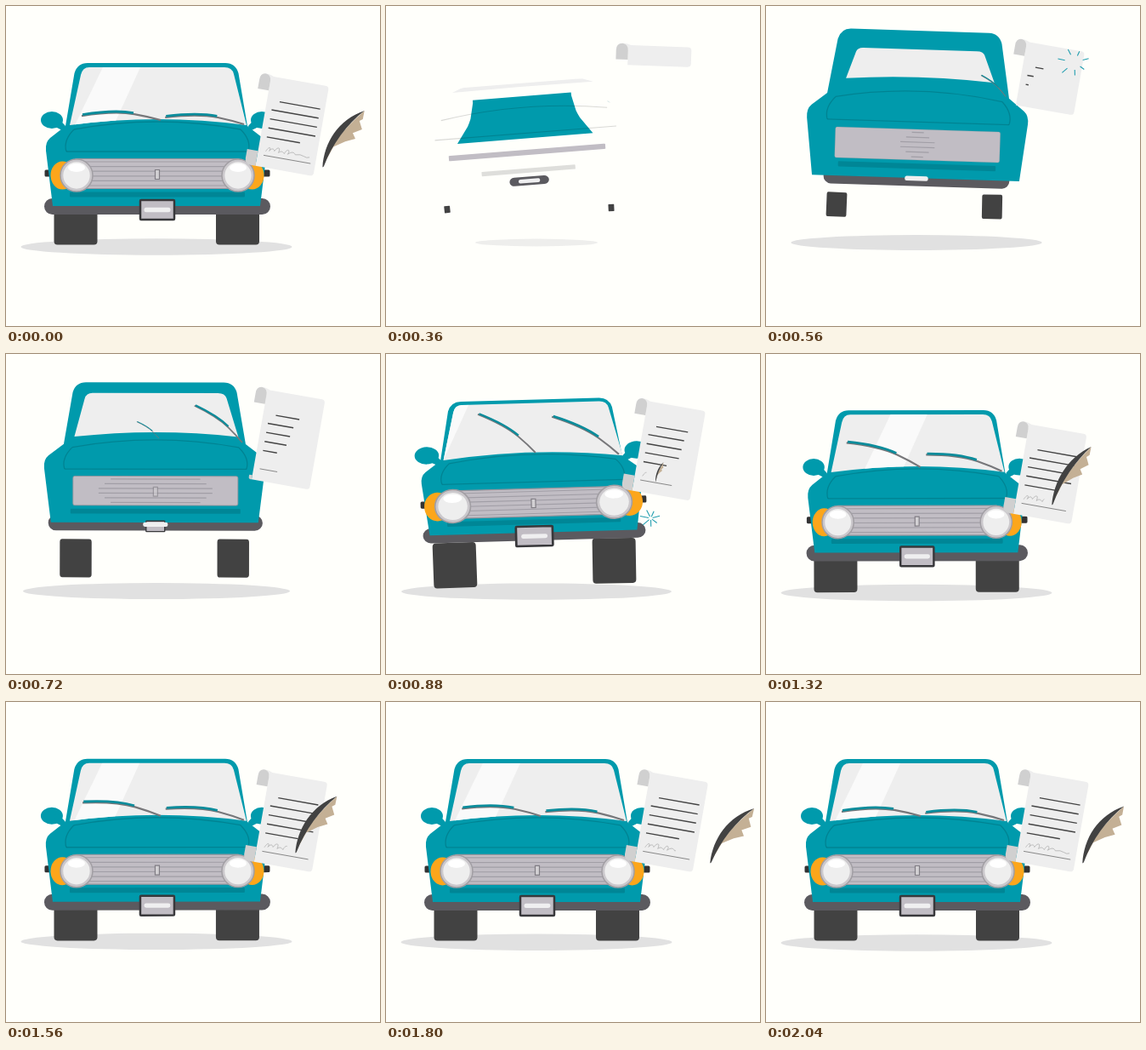
An HTML page for the animation above (2.08 s loop, 440x376 px).

```html
<!DOCTYPE html>
<html lang="en">
<head>
<meta charset="utf-8">
<title>Car contract</title>
<style>
  html, body { margin: 0; width: 100%; height: 100%; overflow: hidden; background: #fffffb; }
  svg { display: block; width: 440px; height: 376px; }
</style>
</head>
<body>
<svg viewBox="0 0 440 376">
  <defs><clipPath id="clip"><path id="pane" d="M98 72H257Q266 72 268 80L283 140Q178 126 75 140L88 81Q90 72 98 72Z"/></clipPath></defs>
  <g id="scene">
    <ellipse id="shadow" cx="177" fill="#e1e1e1"/>
    <rect id="wheelL" x="-25.5" y="-26" width="51" height="52" rx="4" fill="#424242"/>
    <rect id="wheelR" x="-25.5" y="-26" width="51" height="52" rx="4" fill="#424242"/>
    <g id="car">
      <rect id="bumper" fill="#5b5a5f"/>
      <g id="mirrorL" fill="#009aac"><ellipse rx="13" ry="10"/><path d="M5-5L16 7 14 13 2 7Z"/></g>
      <g id="mirrorR" fill="#009aac"><ellipse rx="13" ry="10"/><path d="M-5-5L-16 7-14 13-2 7Z"/></g>
      <rect id="markL" x="-4" y="-4" width="8" height="8" rx="1.5" fill="#333"/>
      <rect id="markR" x="-4" y="-4" width="8" height="8" rx="1.5" fill="#333"/>
      <path id="body" fill="#009aac"/>
      <g id="glass">
        <use href="#pane" fill="#eee"/>
        <g clip-path="url(#clip)"><path id="glare" d="M115 70H159L126 142H80Z" fill="#fafafa"/></g>
      </g>
      <g fill="none" stroke="#000" stroke-opacity=".15" stroke-width="1.3">
        <path d="M80 145Q178 127 276 145"/>
        <path d="M71 171H285"/>
        <path id="hoodSides" d="M80 145Q67 158 71 171M276 145Q289 158 285 171"/>
      </g>
      <rect id="strip" x="-103" y="218.5" width="206" height="6" rx="1" fill="#000" fill-opacity=".13"/>
      <g id="wiperL"></g>
      <g id="wiperR"></g>
      <rect id="grille" x="-97" y="-17.5" width="194" height="35" rx="2" fill="#c1bdc4" stroke="#99969e"/>
      <path id="slats" fill="none" stroke="#a19ea6" stroke-width="1.2"/>
      <rect id="badge" x="175.5" y="192.5" width="5" height="11" fill="#d2d0d3" stroke="#807d84" stroke-width="1.2"/>
      <g id="lampL"></g>
      <g id="lampR"></g>
      <rect id="plate" x="-20" y="-11.5" width="40" height="23" rx="1" fill="#c1bdc4" stroke="#38383b" stroke-width="2.5"/>
      <rect id="pill" x="-15.5" y="-2.7" width="31" height="5.4" rx="2.5" fill="#efeff0"/>
    </g>
    <g id="paper">
      <path id="sheet" fill="#eee"/>
      <path d="M0 17H-13V6Q-13-2-6-2Q0-1 0 6Z" fill="#d0d0d0"/>
      <path id="foot" d="M0 0V-18H-13V-7Q-13 0-5 0Z" fill="#d0d0d0"/>
      <path id="text" fill="none" stroke="#444" stroke-width="1.4"/>
      <path id="rule" fill="none" stroke="#777" stroke-width=".8"/>
      <path id="sign" pathLength="1" stroke-dasharray="1" fill="none" stroke="#b4b4b4" stroke-width=".8"
        d="M9 88c3-7 6-6 4-1 2-4 5-4 6-1 3-6 7-6 5 1 3-3 5-2 7 0 2-7 7-6 4 0 4-4 7-4 9-1q6-2 10 0t7 0"/>
    </g>
    <g id="feather">
      <path d="M2-4Q9-31 50-66L48-56 44-54 47-44 36-40 39-33 27-30 13-24Z" fill="#c4b095"/>
      <path d="M0 0C2-29 19-56 50-66C29-50 12-28 1.500-1Z" fill="#424242"/>
    </g>
    <path id="sparks" fill="none" stroke="#239fb0" stroke-width="1.1"/>
  </g>
</svg>
<script>
const LOOP = 2080, STEP = 40, BIRTH = 200, RISE = 360, APEX = 560, LAND = 880;
const $ = Object.fromEntries([...document.querySelectorAll('[id]')].map(el => [el.id, el]));
let t = 0;

const set = (el, attrs) => { for (const k in attrs) el.setAttribute(k, attrs[k]); };
const pose = (el, x, y, rot = 0, sx = 1, sy = sx, after = '') =>
  set(el, { transform: `translate(${x} ${y}) rotate(${rot}) scale(${sx} ${sy}) ${after}` });

// Easing: all of these read the current time.
const ramp = (a, b) => Math.min(1, Math.max(0, (t - a) / (b - a)));
const smooth = (a, b) => { const p = ramp(a, b); return p * p * (3 - 2 * p); };
const decay = (start, tau) => Math.exp(-Math.max(0, t - start) / tau);
const ease = (start, tau) => 1 - decay(start, tau);
const pulse = (a, b) => Math.sin(Math.PI * ramp(a, b));
const pop = (start, length, bounce = 1.7) => {
  const q = ramp(start, start + length) - 1;
  return 1 + (bounce + 1) * q ** 3 + bounce * q ** 2;
};
// A jump: rising pose, top, landing, then an exponential settle.
const jump = (rise, apex, land, rest) => t < LAND
  ? rise + (apex - rise) * smooth(RISE, APEX) + (land - apex) * smooth(APEX, LAND)
  : rest + (land - rest) * decay(LAND, 160);

const lamp = side => `<ellipse cx="${side * 16.5}" rx="14" ry="16.5" fill="#fca61b"/>
  <circle r="19" fill="#cbc8cc" stroke="#a19ea3" stroke-width="1.5"/>
  <circle r="15.7" fill="#eee"/><ellipse cy="-9" rx="10" ry="5" fill="#fff"/>`;
const wiper = `<g fill="none"><path d="M-93-5Q-55-11-31-7Q-14-4 0 0" stroke="#77777a" stroke-width="2.2"/>
  <path d="M-92-6.500Q-55-12.500-32-8.500" stroke="#0a8c9b" stroke-width="2.8"/></g>`;
$.lampL.innerHTML = lamp(-1);
$.lampR.innerHTML = lamp(1);
$.wiperL.innerHTML = $.wiperR.innerHTML = wiper;

// Half outline as [distance from the middle, y]; the other half is mirrored.
const HALF = [[81, 67], [93, 67], [96.5, 79], [107, 141], [125, 155], [131, 160], [130, 170], [122, 235]];

function bodyPath(morph) {
  const half = HALF.map(([x, y]) => {
    const f = (y - 67) / 168, seedX = 58 + 22 * f * f, seedY = 121 + 57 * f;
    return [seedX + (x - seedX) * morph, seedY + (y - seedY) * morph];
  });
  const right = half.map(([x, y]) => `${177 + x} ${y}`);
  const left = half.map(([x, y]) => `${177 - x} ${y}`).reverse();
  const [a, b, c, d, e, f, g, h] = right, [H, G, F, E, D, C, B, A] = left;
  return `M${a}Q${b} ${c}L${d} ${e}Q${f} ${g}L${h} ${H} ${G}Q${F} ${E}L${D} ${C}Q${B} ${A}Z`;
}

function slatPath(spread) {
  let d = '';
  for (let i = 0; i < 6; i++) {
    const half = 97 * spread * (1 - (1 - spread) * Math.abs(i - 2.5) / 2.7);
    if (half > 0) d += `M${178 - half} ${183 + i * 5.6}h${half * 2}`;
  }
  return d;
}

function drawCar() {
  const tilt = jump(-4.5, 1.8, -1.6, 0), born = ramp(BIRTH, RISE);

  const spread = ease(300, 100);
  set($.shadow, { cy: 278 + 5 * ramp(APEX, 2040), rx: 159.5 * spread, ry: 9.7 * spread, opacity: Math.min(1, spread + .1) });

  const size = ramp(280, LAND), wheelY = jump(238, 234.5, 245.5, 254), sway = 1.7 * tilt * size;
  const wheelH = Math.min(1.02, size * 1.18);
  pose($.wheelL, jump(72, 83, 81, 82), wheelY - sway, tilt * 1.3, size, wheelH);
  pose($.wheelR, jump(265, 266, 268.5, 272.5), wheelY + sway, tilt * .6, size, wheelH);

  pose($.car, jump(166, 178.2, 173.5, 178), jump(172, 163, 174.5, 197) - 8 * pulse(APEX, LAND), tilt,
    born * (1 - .025 * pulse(900, 1500)), born * jump(.87, 1.03, .93, 1), 'translate(-178 -197)');

  const reach = ease(335, 130), w = 266 * reach, h = 10 + 9 * reach;
  set($.bumper, { x: 178 - w / 2, y: 235.5 - h / 2, width: w, height: h, rx: h / 2 });
  set($.body, { d: bodyPath(smooth(RISE, APEX)) });

  const fit = pop(720, 280);
  pose($.mirrorL, 54, 134, 0, fit);
  pose($.mirrorR, 301, 134, 0, fit);
  pose($.markL, 49.5, 196.5, 0, fit);
  pose($.markR, 306.5, 196.5, 0, fit);
  pose($.lampL, 83, 199, 0, fit);
  pose($.lampR, 273, 199, 0, fit);

  pose($.glass, 178, 106, 0, jump(.8, .84, 1.015, 1), jump(.08, .52, 1.02, 1), 'translate(-178 -106)');
  pose($.glare, jump(-130, -130, -52, 0) + 48 * pulse(LAND, 1480), 0);
  set($.hoodSides, { opacity: ramp(RISE, APEX) });
  pose($.strip, 178, 0, 0, ease(260, 130), 1);

  pose($.wiperL, 182, 134, 36 * decay(1060, 345) - 2, smooth(APEX, 960));
  pose($.wiperR, 280, 139, 34 * decay(820, 345) + 1, smooth(280, 920));

  const open = ramp(310, APEX), lines = ramp(480, 810);
  pose($.grille, 178, 197, 0, .94 + .06 * open, open);
  set($.grille, { 'stroke-width': 1.2 * lines });
  set($.slats, { d: slatPath(lines) });
  set($.badge, { opacity: ramp(600, 800) });
  pose($.plate, 178, 239.5, 0, pop(680, 280));
  pose($.pill, 178, 235.5 + 4 * smooth(APEX, LAND), 0, .82 + .18 * ramp(RISE, LAND), 1);
}

function textRow(i) {
  const x = i ? 7.3 : 15, end = i === 4 ? 47 : 63.5;
  const grown = ease(505 + 20 * i, 248);
  return grown ? `M${x} ${28 + 10.8 * i + (i > 4 ? 11 : 0)}h${(end - x) * grown}` : '';
}

function drawPaper() {
  const turn = smooth(RISE, APEX), born = ramp(BIRTH, RISE);
  const x = 285 + 22 * turn + 5 * ramp(APEX, 2040);
  const y = 46 - 4 * turn + 40.5 * pop(850, 390);
  pose($.paper, x, y, 2 + 8 * turn, born * (1.08 - .08 * turn), born);

  const h = 18 + 89 * ramp(340, 680);
  set($.sheet, { d: `M-6-2Q0-2 3 0H65Q69 0 69 4V${h - 4}Q69 ${h} 65 ${h}H0V6Q0-1-6-2Z` });
  pose($.foot, 0, 107, 0, ramp(680, 820));
  set($.text, { d: [0, 1, 2, 3, 4].map(textRow).join('') });
  set($.rule, { d: textRow(5) });

  const written = .6 * ease(850, 200) + .4 * smooth(1600, 2000);
  set($.sign, { 'stroke-dashoffset': 1 - written, opacity: written ? 1 : 0 });

  // The quill writes, rocks, then lifts off to the right.
  const away = pop(1600, 400, 4);
  const rock = -15 * decay(LAND, 450) * Math.cos((t - LAND) * Math.PI / 190);
  pose($.feather, x + 9 + 24 * ease(LAND, 330) + 28 * away, y + 95 + 12 * Math.min(1, away),
    rock - 52.9, ramp(820, 1020), ease(820, 250), 'rotate(52.9)');
}

function burst(x, y, start, life) {
  const p = (t - start) / life;
  if (p <= 0 || p >= 1) return '';
  const outer = 18 * (1 - (1 - p) ** 3), inner = outer * p ** 1.2;
  let d = '';
  for (let i = 0; i < 7; i++) {
    const a = i * Math.PI * 2 / 7 - .25, r = 1 + .18 * Math.sin(i * 5);
    const point = q => `${x + Math.cos(a) * q * r} ${y + Math.sin(a) * q * r}`;
    d += `M${point(inner)}L${point(outer)}`;
  }
  return d;
}

function render(ms) {
  // The loop opens on the finished picture, then starts over empty.
  t = Math.floor((ms % LOOP) / STEP) * STEP || LOOP;
  set($.scene, { visibility: t > BIRTH ? 'visible' : 'hidden' });
  drawCar();
  drawPaper();
  set($.sparks, { d: burst(363, 66, 420, 220) + burst(311.5, 193, 800, 300) });
}

const begin = performance.now();
function tick() {
  render(performance.now() - begin);
  requestAnimationFrame(tick);
}
tick();
</script>
</body>
</html>
```
